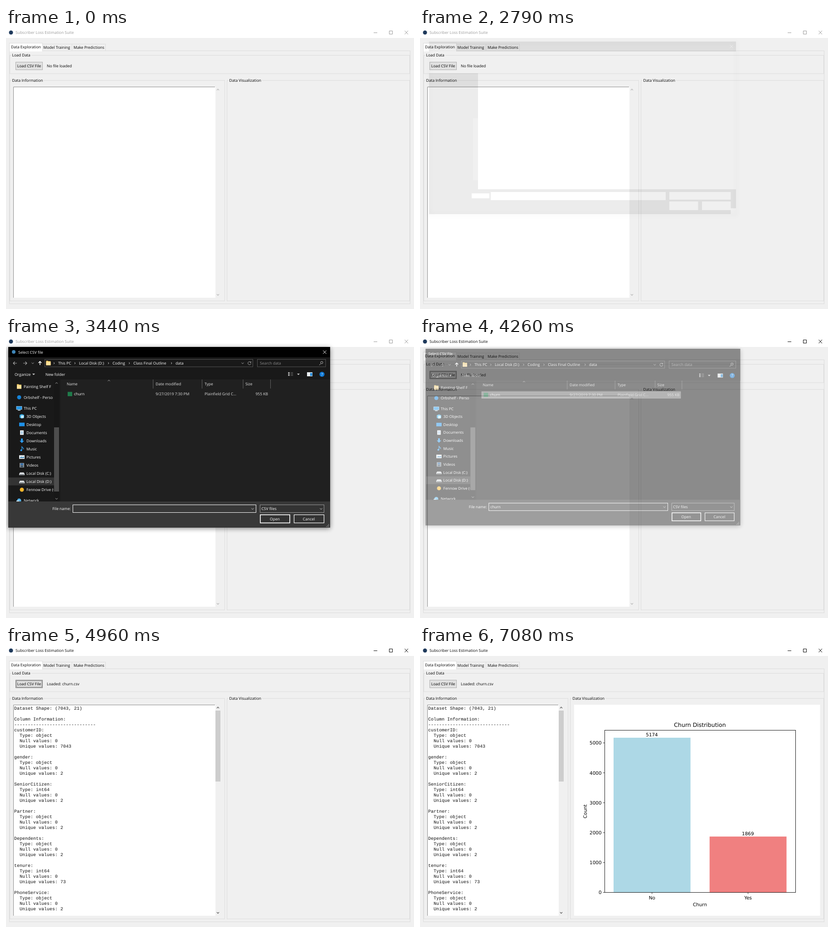
Recreate the animation shown at these times as an HTML page. Size 900x622 px, loop 8000 ms.

```html
<!DOCTYPE html>
<html lang="en">
<head>
<meta charset="utf-8">
<title>Data exploration</title>
<style>
html, body { margin: 0; width: 100%; height: 100%; overflow: hidden; background: #f0f0f0; }
svg { display: block; width: 900px; height: 622px; }
text { font: 8.5px "Open Sans", "Noto Sans", sans-serif; white-space: pre; text-rendering: geometricPrecision; }
.mono text { font: 10px "Liberation Mono", monospace; fill: #111; }
.plot text { font: 10.4px "DejaVu Sans", sans-serif; }
.plot .big { font-size: 12.5px; }
</style>
</head>
<body>
<svg id="stage" viewBox="0 0 900 622" xmlns="http://www.w3.org/2000/svg"></svg>
<script>
const LOOP = 8000;

// ---- markup helpers (y of a label is the middle of its capitals) ----
const rect = (x, y, x2, y2, fill, stroke, w = 1, more = '') =>
  `<rect x="${x}" y="${y}" width="${x2 - x}" height="${y2 - y}" fill="${fill}"` +
  (stroke ? ` stroke="${stroke}" stroke-width="${w}"` : '') + ` ${more}/>`;
const line = (d, c, w = 1, more = '') => `<path d="${d}" fill="none" stroke="${c}" stroke-width="${w}" ${more}/>`;
const shape = (d, c) => `<path d="${d}" fill="${c}"/>`;
const dot = (x, y, r, c) => `<circle cx="${x}" cy="${y}" r="${r}" fill="${c}"/>`;
const label = (x, y, s, c = '#000', more = '') => `<text x="${x}" y="${y + 3}" fill="${c}" ${more}>${s}</text>`;
const group = (id, body, more = '') => `<g id="${id}" ${more}>${body}</g>`;
const mid = 'text-anchor="middle"', end = 'text-anchor="end"';
const chevron = (x, y, dx, dy, c, w = 1) => dy
  ? line(`M${x - 2.5} ${y - dy}L${x} ${y + dy}L${x + 2.5} ${y - dy}`, c, w)
  : line(`M${x - dx} ${y - 2}L${x + dx} ${y}L${x - dx} ${y + 2}`, c, w);
const cross = (x, y, r, c) => line(`M${x - r} ${y - r}l${2 * r} ${2 * r}M${x + r} ${y - r}l${-2 * r} ${2 * r}`, c);
const shadow = (x, y, x2, y2) => rect(x, y + 2, x2, y2 + 2, '#000', '', 0, 'opacity=".48" filter="url(#blur)"');

// ---- main window ----
const frame = (x, y, x2, y2, s) => rect(x, y, x2, y2, 'none', '#dcdcdc') +
  label(x + 5, y - .5, s, '#000', 'stroke="#f0f0f0" stroke-width="5" paint-order="stroke"');

function report() {
  const cols = [['customerID', 'object', 7043], ['gender', 'object', 2], ['SeniorCitizen', 'int64', 2],
    ['Partner', 'object', 2], ['Dependents', 'object', 2], ['tenure', 'int64', 73], ['PhoneService', 'object', 2]];
  const rows = ['Dataset Shape: (7043, 21)', '', 'Column Information:', '-'.repeat(30)];
  for (const [name, type, n] of cols)
    rows.push(name + ':', '  Type: ' + type, '  Null values: 0', '  Unique values: ' + n, '');
  return rows.map((s, i) => s && `<text x="18" y="${141 + i * 12}">${s}</text>`).join('');
}

function panes(id, right, loaded) {
  const ink = loaded ? '#505050' : '#b4b4b4', x = right + 5.5;
  return group(id,
    frame(8.5, 116, right + 20.5, 604, 'Data Information') +
    frame(right + 25.5, 116, 890.5, 604, 'Data Visualization') +
    rect(16, 130, right, 597, '#fff') +
    line(`M16.5 597V130.5H${right - 1}`, '#8a8a8a') +
    chevron(x, 136.5, 0, -1.4, ink, 1.2) + chevron(x, 590.5, 0, 1.4, ink, 1.2) +
    (loaded ? rect(right, 143, right + 11, 300, '#cdcdcd', '', 0, 'class="thumb"') +
      '<use href="#report"/>' : ''));
}

function plot() {
  const base = 545.5, py = v => base - v * .0662;
  const bar = (x, v, c, name) =>
    rect(x, py(v), x + 169.7, base, c) +
    `<text x="${x + 84.5}" y="${py(v) - 3}" ${mid}>${v}</text>` +
    `<text x="${x + 84.8}" y="560.5" ${mid}>${name}</text>` +
    line(`M${x + 84.8} ${base}v3.6`, '#000', .8);
  let out = rect(340, 130, 882.5, 597, '#fff') +
    bar(427, 5174, '#add8e6', 'No') + bar(638.8, 1869, '#f08080', 'Yes');
  for (let v = 0; v <= 5000; v += 1000)
    out += line(`M407.5 ${py(v)}h-3.6`, '#000', .8) + `<text x="400.5" y="${py(v) + 3.8}" ${end}>${v}</text>`;
  return out + rect(407.5, 186.5, 828.5, base, 'none', '#000', .9) +
    `<text class="big" x="617.5" y="179.3" ${mid}>Churn Distribution</text>` +
    `<text x="617.5" y="576" ${mid}>Churn</text>` +
    `<text transform="translate(367.5 366) rotate(-90)" ${mid}>Count</text>`;
}

function mainWindow() {
  return rect(0, 0, 900, 622, '#f0f0f0') + rect(0, 0, 900, 22, '#fff') +
    dot(11, 10, 4.5, '#1f3a5c') +
    label(21, 10, 'Subscriber Loss Estimation Suite', '#999', 'id="caption"') +
    group('controls', '<path d="M811 10.5h8M845.5 6.5h7v7h-7zM879.5 6l7.5 8M887 6l-7.5 8"/>', 'fill="none" stroke="#999"') +
    rect(7.5, 50.5, 891.5, 610.5, 'none', '#dcdcdc') +
    rect(80.5, 35.5, 145.5, 50.5, '#f0f0f0', '#dcdcdc') + rect(145.5, 35.5, 219.5, 50.5, '#f0f0f0', '#dcdcdc') +
    rect(7.5, 33.5, 80.5, 51, '#fff', '#dcdcdc') + rect(8, 50, 80, 52, '#fff') +
    label(11, 42, 'Data Exploration') + label(82.5, 43, 'Model Training') + label(149, 43, 'Make Predictions') +
    frame(8.5, 60.5, 890.5, 101, 'Load Data') +
    rect(21.5, 75.5, 80.5, 92.5, '#e1e1e1', '#adadad', 1, 'id="load"') +
    rect(23, 77, 79, 91, 'none', '#222', 1, 'id="focus" stroke-dasharray="1 1"') +
    label(51, 84, 'Load CSV File', '#000', mid) + label(90, 84, 'No file loaded', '#000', 'id="status"') +
    panes('empty', 462, false) + panes('wide', 462, true) + panes('narrow', 306, true) +
    group('plot', plot(), 'class="plot"');
}

// ---- unpainted outline of the file dialog ----
function ghost() {
  const box = (x, y, x2, y2) => `M${x} ${y}H${x2}V${y2}H${x}Z`;
  const d = box(20, 30, 697, 52) + box(20, 100, 128, 357) + box(20, 357, 697, 412) +
    box(114, 366, 153, 377) + box(156, 363, 542, 381) + box(550, 363, 685.5, 380) +
    box(550, 384, 613.5, 403) + box(622, 384, 685.5, 403) + box(685.5, 399, 697, 412);
  return `<path d="${d}" fill-rule="evenodd" opacity=".075"/>` +
    rect(117, 200, 128, 337, '#fff', '', 0, 'opacity=".2"') + cross(687, 41, 3.5, '#ececec') +
    rect(20, 32, 698, 414, 'none', '#000', 3, 'opacity=".05" filter="url(#blur)"');
}

// ---- file dialog ----
const folder = (x, y) => shape(`M${x - 5} ${y - 5}h4l1 1h5v9h-10z`, '#f5cf6b') + shape(`M${x - 5} ${y - 2}h10v7h-10z`, '#ffe19a');
const screen = (x, y) => rect(x - 6, y - 4, x + 6, y + 3, '#2196e8', '#bfe3fa', .7) + rect(x - 3, y + 4, x + 3, y + 5.5, '#bfe3fa');
const drive = (x, y) => shape(`M${x - 6} ${y + 1}l2-3h8l2 3v3h-12z`, '#d9dde0') + rect(x - 5, y + 2, x + 5, y + 3.4, '#5a6268');
const page = (x, y) => rect(x - 4, y - 5, x + 4, y + 5, '#f1f5f8') +
  line(`M${x - 2.5} ${y - 2}h5m-5 2h5m-5 2h5`, '#4b93cf', .8);

function sidebar() {
  const icons = {
    cube: (x, y) => shape(`M${x - 5} ${y - 3}l5-2 5 2v6l-5 2-5-2z`, '#35a8e0') + rect(x - 2, y - 2, x + 4, y + 4, '#c9ecfa'),
    desk: (x, y) => rect(x - 6, y - 4, x + 6, y + 4, '#1e90e8'),
    down: (x, y) => shape(`M${x - 2} ${y - 5}h4v5h3l-5 5-5-5h3z`, '#2d9bee'),
    note: (x, y) => dot(x - 1.5, y + 3, 2, '#2d9bee') + line(`M${x} ${y + 3}v-8l3.5 4v2`, '#2d9bee', 1.3),
    pic: (x, y) => rect(x - 6, y - 4, x + 6, y + 4, '#eef3f6') + shape(`M${x - 5} ${y + 2}l3-3 3 1 4-1v3z`, '#3d87b8'),
    film: (x, y) => rect(x - 5, y - 5, x + 5, y + 5, '#8d9499') + rect(x - 3, y - 4, x + 3, y - .5, '#2b69a8') + rect(x - 3, y + .5, x + 3, y + 4, '#39536a'),
    net: (x, y) => dot(x, y, 4.5, '#56b4ea') + rect(x - 6, y, x, y + 5, '#cfe6f3'),
    blue: (x, y) => dot(x, y, 4.5, '#1583d8'),
    gold: (x, y) => dot(x, y, 4.5, '#f3b52b'),
    folder, screen, drive, page
  };
  const top = [['folder', 109.5, 'Painting Shelf F'], ['blue', 133.5, 'Orbshelf - Perso'],
    ['screen', 157.5, 'This PC'], ['net', 362, 'Network']];
  const sub = [['cube', '3D Objects'], ['desk', 'Desktop'], ['page', 'Documents'], ['down', 'Downloads'],
    ['note', 'Music'], ['pic', 'Pictures'], ['film', 'Videos'], ['drive', 'Local Disk (C:)'],
    ['drive', 'Local Disk (D:)'], ['gold', 'Fennow Drive (C']];
  return rect(5, 94, 119.5, 364, '#191919') + rect(5, 311, 106, 328.5, '#333') +
    '<g clip-path="url(#side)">' +
    top.map(([k, y, s]) => icons[k](29, y) + label(39, y, s, '#fff')).join('') +
    sub.map(([k, s], i) => {
      const y = 175.5 + i * 18.05;
      return icons[k](35, y) + label(45, y, s, '#fff');
    }).join('') + '</g>' +
    rect(106, 94, 117, 364, '#171717') + rect(106, 200, 117, 342, '#4d4d4d') +
    chevron(111.5, 102, 0, -1.3, '#aaa') + chevron(111.5, 358, 0, 1.3, '#aaa');
}

function fileDialog() {
  const W = '#fff', G = '#9a9a9a';
  const crumbs = [[115, 'This PC'], [161, 'Local Disk (D:)'], [235, 'Coding'], [281, 'Class Final Outline'], [374, 'data']];
  let out = shadow(5, 22, 715, 422) + rect(5, 22, 715, 422, '#202020') +
    rect(5, 22, 715, 45, '#000', '', 0, 'id="bar"') + rect(5, 45, 715, 94, '#191919') +
    group('head', dot(17, 33, 4, '#3f86b8') + label(27, 33.5, 'Select CSV file', W) + cross(703, 33.5, 3.7, W)) +
    group('headOff', label(11, 33.5, 'Select CSV file', W)) +
    line('M24 58h-8m3.5-3.5l-3.5 3.5 3.5 3.5', '#aaa', 1.2) + line('M38 58h8m-3.5-3.5l3.5 3.5-3.5 3.5', '#aaa', 1.2) +
    chevron(59, 58, 0, 1.2, '#aaa') + line('M75 62v-8m-3.5 3.5l3.5-3.5 3.5 3.5', W, 1.5) +
    rect(85.5, 49.5, 544.5, 66, 'none', '#555') + folder(93.5, 57.5) +
    crumbs.map(([x, s]) => chevron(x - 9, 58, 1, 0, '#ccc') + label(x, 58, s, W)).join('') +
    chevron(522, 58, 0, 1.3, '#aaa') + line('M539.8 56a3.4 3.4 0 1 0 .6 2.5M540.3 54v2.4h-2.4', '#aaa') +
    rect(554.5, 49.5, 705, 66, 'none', '#555') + label(560, 58, 'Search data', '#8c8c8c') +
    line('M694.5 59l-3.5 3.2M699 56.6a2.5 2.5 0 1 1-5 0a2.5 2.5 0 1 1 5 0', '#bbb') +
    label(19, 82.5, 'Organize', W) + shape('M58 81h6l-3 3.2z', '#ccc') + label(87, 82.5, 'New folder', W) +
    line('M622.5 79h3m-3 3h3m-3 3h3', '#ddd', 1.8) + line('M628 79h6m-6 3h6m-6 3h6', '#999', 1, 'stroke-dasharray="2 1"') +
    shape('M642 81h6l-3 3.2z', '#ccc') +
    rect(664, 78, 676, 87, '#e9eef2') + rect(671, 79.5, 675.5, 86, '#1f87d6') +
    dot(697, 82.5, 5.6, '#0f78d4') + label(697, 82.5, '?', W, mid + ' font-weight="bold"') +
    sidebar() +
    rect(131.5, 119, 580.5, 134, 'none', 'none', 1, 'id="row"') +
    [324.5, 432.5, 523, 583.5].map(x => line(`M${x} 94V114`, '#636363')).join('') +
    chevron(227, 96.5, 0, -1.2, '#aaa') +
    label(134, 104, 'Name', '#e4e4e4') + label(330, 104, 'Date modified', '#e4e4e4') +
    label(438, 104, 'Type', '#e4e4e4') + label(528, 104, 'Size', '#e4e4e4') +
    rect(136, 121.5, 146, 131, '#1f7a4a') + label(150, 126, 'churn', W) +
    label(330, 126, '9/27/2019 7:30 PM', '#dedede') + label(438, 126, 'Plainfield Grid C...', '#dedede') +
    label(578, 126, '955 KB', '#dedede', end);
  out += rect(5, 364, 715, 422, '#383838') + label(143, 380, 'File name:', W, end) +
    rect(147.5, 371.5, 551.5, 388.5, '#383838', W) + chevron(544, 380.5, 0, 1.3, '#ccc') +
    label(151, 380, 'churn', W, 'id="name"') + line('M151.5 374v12', W, 1, 'id="caret"') +
    rect(560.5, 371.5, 701.5, 388.5, '#333', G) + label(563.5, 380, 'CSV files', W) + chevron(695, 380.5, 0, 1.3, '#ccc') +
    rect(561, 393.5, 626, 411.5, '#333', W, 1.7) + label(593, 402.5, 'Open', W, mid) +
    rect(635.5, 393.5, 701.5, 411.5, '#333', W, 1.2) + label(668, 402.5, 'Cancel', W, mid);
  for (let i = 0; i < 3; i++)
    for (let j = 0; j <= i; j++) out += rect(711 - j * 2.3, 414.5 + i * 2.3, 712.2 - j * 2.3, 415.7 + i * 2.3, '#bbb');
  return out;
}

// ---- message box ----
const messageBox = () => shadow(382, 262, 549, 375) + shadow(384, 264, 549, 375) +
  rect(382, 260.5, 549, 374, '#fff') + rect(382, 342, 549, 374, '#f0f0f0') +
  rect(382, 260.5, 549, 374, 'none', '#6f7478') +
  dot(394, 271.5, 4, '#1f3a5c') + label(404, 271.5, 'Success') + cross(537, 271, 3.7, '#000') +
  dot(410, 312.5, 11.6, '#0078d7') + rect(409.2, 310, 410.9, 318.5, '#fff') + dot(410, 307, 1.2, '#fff') +
  label(429, 313, 'Data loaded successfully!', '#000', 'style="font-size:8.3px"') +
  rect(482, 351, 536, 365, '#e1e1e1', '#0078d7', 2, 'id="ok"') + label(509, 358, 'OK', '#000', mid);

const stage = document.getElementById('stage');
stage.innerHTML = '<defs><filter id="blur" x="-20%" y="-20%" width="140%" height="140%"><feGaussianBlur stdDeviation="5.5"/></filter>' +
  '<clipPath id="side"><rect x="5" y="94" width="100" height="270"/></clipPath>' +
  group('report', report(), 'class="mono"') + '</defs>' +
  mainWindow() + group('ghost', ghost()) + group('files', fileDialog()) + group('message', messageBox());

// ---- timeline ----
const $ = id => document.getElementById(id);
const within = (t, a, b) => t >= a && t < b;
const show = (id, on) => $(id).style.display = on ? '' : 'none';
const paint = (id, fill, stroke) => { $(id).setAttribute('fill', fill); $(id).setAttribute('stroke', stroke); };
const ramp = (t, a, b) => Math.min(1, Math.max(0, (t - a) / (b - a)));

// Fades and zooms a window in over [a, b] and out over [c, d].
function zoom(id, t, cx, cy, [a, b, c, d]) {
  const p = 1 - (1 - ramp(t, a, b)) ** 2, q = ramp(t, c, d);
  const s = 1 - .046 * (1 - p) - .044 * q;
  show(id, within(t, a, d));
  $(id).setAttribute('opacity', (.08 + .92 * p) * (1 - q));
  $(id).setAttribute('transform', s === 1 ? '' : `translate(${cx} ${cy}) scale(${s}) translate(${-cx} ${-cy})`);
}

function update(t) {
  const active = within(t, 890, 2140) || within(t, 4200, 5270) || t >= 6640;
  $('caption').setAttribute('fill', active ? '#000' : '#999');
  $('controls').setAttribute('stroke', active ? '#000' : '#999');

  const focused = within(t, 1960, 2140) || within(t, 4200, 5270);
  if (within(t, 1960, 2050)) paint('load', '#cce4f7', '#005499');
  else if (within(t, 1730, 2140)) paint('load', '#e5f1fb', '#0078d7');
  else paint('load', '#e1e1e1', focused ? '#7a7a7a' : '#adadad');
  show('focus', focused);

  const loaded = t >= 4960, charted = t >= 4995;
  $('status').textContent = loaded ? 'Loaded: churn.csv' : 'No file loaded';
  show('empty', !loaded);
  show('wide', loaded && !charted);
  show('narrow', charted);
  show('plot', charted);
  $('narrow').querySelector('.thumb').setAttribute('fill', within(t, 7050, 7080) ? '#a6a6a6' : '#cdcdcd');

  show('ghost', within(t, 2790, 2830));
  zoom('files', t, 335, 205, [2790, 3050, 4178, 4338]);
  if (t < 2830) show('files', false);
  const closing = t >= 4178;
  show('head', !closing);
  show('headOff', closing);
  $('bar').setAttribute('fill', closing ? '#1c1c1c' : '#000');
  if (t >= 3870) paint('row', '#777', '#8f8f8f');
  else if (t >= 3540) paint('row', '#4d4d4d', '#4d4d4d');
  else paint('row', 'none', 'none');
  show('name', t >= 3870);
  show('caret', t < 3440);

  zoom('message', t, 465.5, 317, [5270, 5530, 6640, 6820]);
  $('ok').setAttribute('fill', within(t, 6520, 6600) ? '#cce4f7' : t >= 6360 ? '#e5f1fb' : '#e1e1e1');
}

const start = performance.now();
function tick(now) {
  update(Math.max(0, now - start) % LOOP);
  requestAnimationFrame(tick);
}
update(0);
requestAnimationFrame(tick);
</script>
</body>
</html>
```
